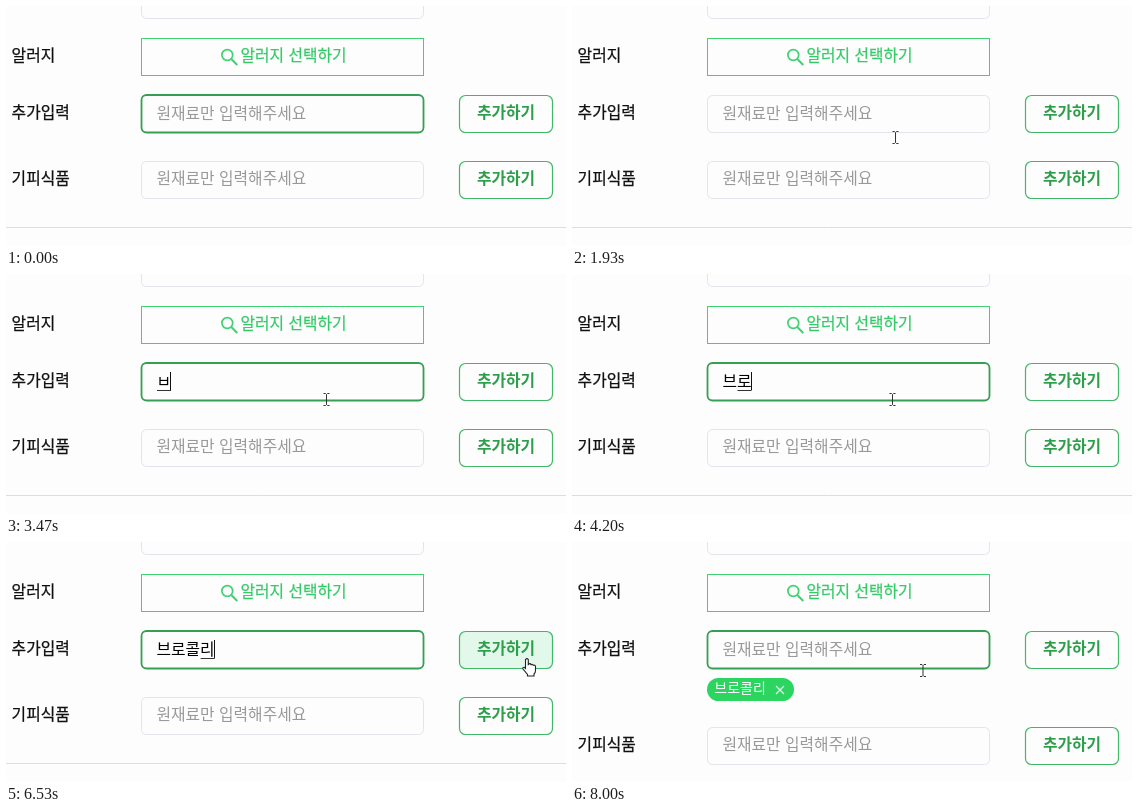
An HTML page for the animation above (8070 ms loop, 560 px wide and 240 px high).

```html
<!DOCTYPE html>
<html lang="ko">
<head>
<meta charset="utf-8">
<style>
html, body { margin: 0; width: 100%; height: 100%; overflow: hidden; background: #fdfdfd; }
svg { display: block; font: 15.8px "Noto Sans CJK KR", "Noto Sans KR", "Noto Sans", sans-serif; }
rect, path { fill: none; }
.field { stroke: #e4e5ec; }
.field.focus { y: 89px; height: 37.5px; stroke: #369f53; stroke-width: 1.8; }
.label { font-weight: 500; fill: #111; stroke: #111; stroke-width: .25; }
.hint { fill: #999; }
.search { stroke: #3ed273; }
.button rect { stroke: #40b867; stroke-width: 1.2; }
.button.hover rect { fill: #e2f8ea; }
.button text { font-weight: 700; fill: #2d9f4b; text-anchor: middle; }
</style>
</head>
<body>
<svg width="560" height="240" viewBox="0 0 560 240">
  <rect class="field" x="135.5" y="-24.5" width="282" height="37" rx="5"/>

  <text class="label" x="5.6" y="55">알러지</text>
  <rect class="search" x="135.5" y="32.5" width="282" height="37"/>
  <g class="search" fill="none" stroke-width="1.7">
    <circle cx="221.3" cy="49" r="5.4"/>
    <path d="M225.3 53l6 6" stroke-width="2"/>
  </g>
  <text x="234.5" y="55" font-weight="500" fill="#36cb69" stroke="#36cb69" stroke-width=".25">알러지 선택하기</text>

  <text class="label" x="5.6" y="112">추가입력</text>
  <rect id="input" class="field" x="135.5" y="89.5" width="282" height="37" rx="5"/>
  <text id="value" x="150.5" y="112.5"></text>
  <path id="underline" stroke="#333"/>
  <path id="caret" stroke="#111"/>
  <g id="add" class="button">
    <rect x="453.5" y="89.5" width="93" height="37" rx="6"/>
    <text x="500" y="112">추가하기</text>
  </g>

  <g id="chip">
    <rect x="135" y="136" width="87" height="23" rx="11.5" style="fill:#2bd55f"/>
    <text x="142.3" y="151" font-size="14" fill="#fff">브로콜리</text>
    <path d="M204 144l8 8m0-8l-8 8" stroke="#e9fff0" stroke-width="1.1"/>
  </g>

  <g id="lower">
    <text class="label" x="5.6" y="178">기피식품</text>
    <rect class="field" x="135.5" y="155.5" width="282" height="37" rx="5"/>
    <text class="hint" x="150.5" y="178">원재료만 입력해주세요</text>
    <g class="button">
      <rect x="453.5" y="155.5" width="93" height="37" rx="6"/>
      <text x="500" y="178">추가하기</text>
    </g>
    <path d="M0 221.5h560" stroke="#e4d6f0"/>
  </g>

  <g id="pointer">
    <path id="beam" d="M-3 -6h2l1 1l1-1h2M0 -5v10M-3 6h2l1-1l1 1h2" stroke="#333"/>
    <path id="hand" d="M-3.5 -7.5q1.5-1.8 2.8 0v5l1-.8q1.3-.3 1.8 1q1.5-.8 2.2.6q1.7-.6 2.2 1v4.500q0 2-1.500 3.200v2h-6.500v-1.500l-4.500-5.500q-.5-2 1.200-1.800l1.300 1.300z" style="fill:#fff" stroke="#222" stroke-width="1.1"/>
    <path id="arrow" d="M-4 -7v13l3-3l2.500 5.500l2-1l-2.500-5h4z" style="fill:#fff" stroke="#222"/>
  </g>
</svg>
<script>
const LOOP = 8070, STEP = 66.67, BLINK = 530, GLYPH = 14.54, LEFT = 150.5;
const BLUR = 1060, FOCUS = 2500, ADD = 6900;
const HINT = '원재료만 입력해주세요';
const keys = [[3350, 'ㅂ'], [3600, '브'], [3900, '블'], [4150, '브로'], [4450, '브롴'],
  [4700, '브로코'], [4950, '브로콜'], [5250, '브로콜ㄹ'], [5460, '브로콜리']];
const blinkStarts = [-BLINK, FOCUS, ...keys.map(k => k[0]), 6950];
// pointer path: time, x, y
const route = [[1330, 345, 250], [1800, 323.5, 131.5], [2050, 323.5, 131.5], [2400, 320.5, 125.5],
  [5700, 320.5, 125.5], [6330, 523, 125], [7130, 523, 125], [7800, 351, 128.5], [LOOP, 351, 128.5]];

const el = id => document.getElementById(id);
const show = (id, on) => el(id).style.display = on ? '' : 'none';
const lastBefore = (list, t) => list.filter(v => v <= t).pop();

function pointerAt(t) {
  const i = route.findIndex(p => p[0] > t);
  if (i < 1) return null;
  const [t0, x0, y0] = route[i - 1], [t1, x1, y1] = route[i];
  const p = (t - t0) / (t1 - t0), e = p * p * (3 - 2 * p);
  return [x0 + (x1 - x0) * e, y0 + (y1 - y0) * e];
}

function drawPointer(t) {
  const pos = pointerAt(t);
  show('pointer', pos);
  const [x, y] = pos || [0, 0];
  const hand = x > 453 && x < 547 && y < 133;
  const beam = x > 135 && x < 422 && y < 133;
  show('hand', hand);
  show('beam', beam);
  show('arrow', !hand && !beam);
  el('pointer').setAttribute('transform', `translate(${x} ${y})`);
  el('add').classList.toggle('hover', hand);
}

function draw(t) {
  const added = t >= ADD, focused = t < BLUR || t >= FOCUS;
  const key = added ? null : keys.filter(k => k[0] <= t).pop();
  const text = key ? key[1] : '';
  const end = LEFT + GLYPH * text.length;
  const caretX = text ? Math.round(end) - .5 : 151.5;

  el('input').classList.toggle('focus', focused);
  el('value').textContent = text || HINT;
  el('value').setAttribute('class', text ? '' : 'hint');
  show('underline', text);
  el('underline').setAttribute('d', `M${end - GLYPH + .5} 116.5H${end}`);
  const phase = Math.floor((t - lastBefore(blinkStarts, t)) / BLINK);
  show('caret', focused && phase % 2 === 0);
  el('caret').setAttribute('d', `M${caretX} 98v18`);

  show('chip', added);
  el('lower').setAttribute('transform', `translate(0 ${added ? 30 : 0})`);
  drawPointer(t);
}

const start = performance.now();
function tick() {
  const t = (performance.now() - start) % LOOP;
  draw(Math.floor(t / STEP + .1) * STEP);
  requestAnimationFrame(tick);
}
tick();
</script>
</body>
</html>
```
